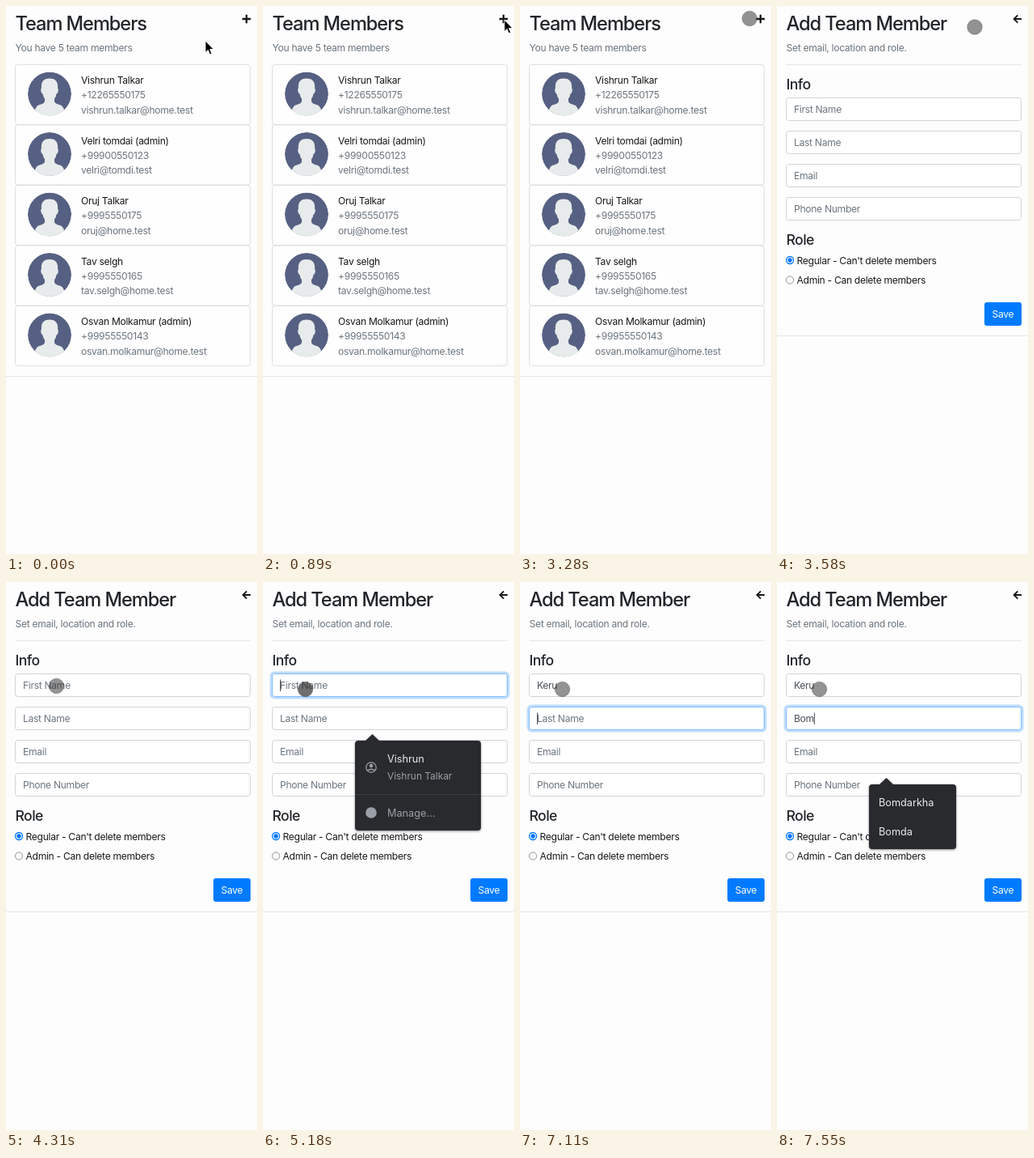
An HTML page that plays this animation: 311x677 px, repeating every 8000 ms.

```html
<!DOCTYPE html>
<html lang="en">
<head>
<meta charset="utf-8">
<title>Team Members</title>
<style>
  html, body { margin: 0; height: 100%; overflow: hidden; background: #fdfdfd; }
  svg { display: block; width: 100vw; height: 100vh; }
  text {
    font: 12.1px Inter, "Open Sans", sans-serif;
    font-optical-sizing: none;
    letter-spacing: -.3px;
    fill: #16191c;
    white-space: pre;
  }
  .h2 { font-size: 23.6px; font-weight: 500; letter-spacing: -1.04px; fill: #212529; }
  .h4 { font-size: 17.6px; font-weight: 500; letter-spacing: -.55px; fill: #212529; }
  .muted { fill: #6c757d; }
  .typed { fill: #495057; }
  .white { fill: #fff; }
  .item { font-size: 12.7px; letter-spacing: 0; fill: #e8eaed; }
  .dim { fill: #9aa0a6; }
  .sub { font-size: 11.9px; letter-spacing: 0; fill: #9aa0a6; }
  .box { fill: #fefefe; stroke: #dfdfdf; }
  .field { fill: #fff; stroke: #ced4da; }
  .focus { fill: #fff; stroke: #80bdff; }
  .ring { fill: none; stroke: #007bff; stroke-opacity: .25; stroke-width: 2.5; }
  .line { stroke: #e6e6e6; }
  .popup { filter: drop-shadow(0 1px 1.5px rgba(0, 0, 0, .45)); fill: #292a2d; }
</style>
</head>
<body>
<svg viewBox="0 0 311 677">
  <defs>
    <clipPath id="round"><circle r="27"/></clipPath>
    <g id="avatar" clip-path="url(#round)">
      <circle r="27" fill="#566082"/>
      <path fill="#e7ebeb" d="M0-19C7-19 11-15 10-7Q11.500-6 10.300-2Q9.500 0 8.500 0Q8 4 6 6V9.500Q6.500 12 14 14Q18 15.500 20 28H-20Q-18 15.500-14 14Q-6.500 12-6 9.500V6Q-8 4-8.500 0Q-9.500 0-10.300-2Q-11.500-6-10-7C-11-15-7-19 0-19Z"/>
    </g>
  </defs>
  <g id="list"></g>
  <g id="form"></g>
  <g id="live"></g>
  <circle id="touch" r="9.300" fill="#282828" stroke="#333" stroke-opacity=".5" stroke-width=".6"/>
  <path id="arrow" d="M0 0V14.500L3.300 11.400L5.600 16.800L8 15.800L5.700 10.500H10.200Z" stroke="#fff" stroke-width=".9"/>
</svg>
<script>
const $ = id => document.getElementById(id);
const text = (x, y, s, cls = '') => `<text x="${x}" y="${y}" class="${cls}">${s}</text>`;
const rect = (x, y, w, h, cls, r = 3) =>
  `<rect x="${x}" y="${y}" width="${w}" height="${h}" rx="${r}" class="${cls}"/>`;
const line = (x1, x2, y) => `<path class="line" d="M${x1} ${y}H${x2}"/>`;
const show = (id, on) => $(id).style.display = on ? '' : 'none';
// Last row whose start time has passed
const at = (rows, t) => rows.findLast(row => row[0] <= t);

const members = [
  ['Vishrun Talkar', '+12265550175', 'vishrun.talkar@home.test'],
  ['Velri tomdai (admin)', '+99900550123', 'velri@tomdi.test'],
  ['Oruj Talkar', '+9995550175', 'oruj@home.test'],
  ['Tav selgh', '+9995550165', 'tav.selgh@home.test'],
  ['Osvan Molkamur (admin)', '+99955550143', 'osvan.molkamur@home.test']
];

$('list').innerHTML =
  text(11.5, 30, 'Team Members', 'h2') +
  text(11.5, 55.5, 'You have 5 team members', 'muted') +
  '<path d="M292.700 16H303.300M298 10.700V21.300" stroke="#16191c" stroke-width="2.400"/>' +
  members.map(([name, phone, mail], i) => `<g transform="translate(0 ${i * 74.5})">` +
    rect(11.5, 72.5, 291, 74, 'box') +
    '<use href="#avatar" x="54" y="108.500"/>' +
    text(93, 96, name) + text(93, 114.300, phone, 'muted') + text(93, 132.700, mail, 'muted') +
    '</g>').join('') +
  line(0, 311, 457.5);

const fieldY = i => 113.5 + i * 41;
const radio = (y, on) => on
  ? `<circle cx="16" cy="${y}" r="4.500" fill="#fff" stroke="#0075ff" stroke-width="1.300"/>
     <circle cx="16" cy="${y}" r="2.700" fill="#0075ff"/>`
  : `<circle cx="16" cy="${y}" r="4.600" fill="#fff" stroke="#767676" stroke-width=".8"/>`;

$('form').innerHTML =
  text(11.5, 30, 'Add Team Member', 'h2') +
  text(11.5, 55.5, 'Set email, location and role.', 'muted') +
  '<path d="M303 16H294M298.300 11.300L293.600 16L298.300 20.700" fill="none" stroke="#16191c" stroke-width="1.900"/>' +
  line(11.5, 303, 72.5) +
  text(11.5, 102.5, 'Info', 'h4') +
  [0, 1, 2, 3].map(i => rect(11.5, fieldY(i), 291, 28, 'field')).join('') +
  text(21, 214, 'Email', 'muted') + text(21, 255, 'Phone Number', 'muted') +
  text(11.5, 294.5, 'Role', 'h4') +
  radio(314, true) + text(24.5, 318.700, "Regular - Can't delete members") +
  radio(338.5) + text(24.5, 343.300, 'Admin - Can delete members') +
  '<rect x="257" y="366" width="46" height="29" rx="3" fill="#007bff"/>' +
  text(266.5, 385, 'Save', 'white') +
  line(0, 311, 407.5);

const bubble = (y, w, h, body) =>
  `<g class="popup">${rect(114, y, w, h, '', 4)}<path d="M126.500 ${y + .5}L135.500 ${y - 8}L144.500 ${y + .5}Z"/></g>${body}`;
const choices = (y, w, items) => bubble(y, w, 8 + 36 * items.length,
  items.map((s, i) => text(126, y + 27 + i * 36, s, 'item')).join(''));
const profile = bubble(196, 156, 111,
  `<g fill="none" stroke="#9aa0a6" stroke-width="1.300">
     <circle cx="134" cy="229" r="6.200"/><path d="M129.500 233Q134 229.500 138.500 233"/></g>
   <circle cx="134" cy="227" r="2.300" fill="#9aa0a6"/>
   <circle cx="134" cy="285" r="6.800" fill="#9aa0a6"/>
   <path d="M114 262.500H270" stroke="#3c4043"/>` +
  text(154, 223, 'Vishrun', 'item') + text(154, 244, 'Vishrun Talkar', 'sub') +
  text(154, 290, 'Manage...', 'item dim'));
const first = choices(196, 72, ['Keru']);
const last = (...items) => choices(250, 108, items);

// start, focused field, first name, last name, popup, caret
const typing = [
  [0, -1, '', '', '', false],
  [5180, 0, '', '', profile, true],
  [5630, 0, '', '', profile, false],
  [5930, 0, 'K', '', '', true],
  [6080, 0, 'K', '', first, true],
  [6220, 0, 'Ke', '', first, true],
  [6670, 0, 'Ker', '', first, true],
  [6820, 0, 'Keru', '', first, true],
  [6960, 0, 'Keru', '', '', true],
  [7110, 1, 'Keru', '', '', true],
  [7260, 1, 'Keru', 'B', last('Bomdarkha', 'Bomda', 'Borvel', 'Bistur'), true],
  [7400, 1, 'Keru', 'Bo', last('Bomdarkha', 'Bomda', 'Borvel'), true],
  [7550, 1, 'Keru', 'Bom', last('Bomdarkha', 'Bomda'), true]
];

// start, x, y
const arrowPath = [
  [0, 247, 43], [150, 249, 41], [300, 256, 36], [450, 268, 28], [600, 282, 21],
  [740, 292, 17], [890, 299, 17], [1040, 297, 17], [1190, 293.5, 16.5], [1340, 293, 16]
];
const touchPath = [
  [0, 298.5, 15.5], [2990, 297, 15.5], [3140, 292, 15.5], [3280, 284.5, 15.5],
  [3430, 270, 18], [3580, 245, 26], [3720, 210, 40], [3870, 166, 61], [4010, 124, 82],
  [4160, 86, 110], [4310, 62.5, 128.5], [4450, 57, 137], [4600, 54, 136],
  [4750, 53, 134], [4890, 52.5, 132.5]
];
const move = (id, [, x, y]) => $(id).setAttribute('transform', `translate(${x} ${y})`);

let shown;
function drawLive(state) {
  if (state === shown) return;
  shown = state;
  const [, focus, given, family, popup, caret] = state;
  const names = [[given, 'First Name'], [family, 'Last Name']];
  $('live').innerHTML =
    (focus < 0 ? '' : rect(11.5, fieldY(focus), 291, 28, 'focus') +
      rect(9.750, fieldY(focus) - 1.750, 294.5, 31.5, 'ring', 4.5)) +
    names.map(([value, hint], i) =>
      text(21, fieldY(i) + 18.700, value || hint, value ? 'typed' : 'muted')).join('') +
    popup;
  if (!caret) return;
  const label = $('live').querySelectorAll('text')[focus];
  const x = 21.5 + (names[focus][0] ? label.getComputedTextLength() : 0);
  label.insertAdjacentHTML('afterend',
    `<path d="M${x} ${fieldY(focus) + 7}v14.500" stroke="#33383d" stroke-width=".9"/>`);
}

function frame(now) {
  const t = now % 8000;
  const onForm = t >= 3430;
  show('list', !onForm);
  show('form', onForm);
  show('live', onForm);
  if (onForm) drawLive(at(typing, t));
  show('arrow', t < 1940);
  show('touch', t >= 1940);
  move('arrow', at(arrowPath, t));
  move('touch', at(touchPath, t));
  const pressed = t >= 5180 && t < 5330;
  $('touch').setAttribute('fill-opacity', pressed ? .67 : .5);
  requestAnimationFrame(frame);
}
requestAnimationFrame(frame);
</script>
</body>
</html>
```
